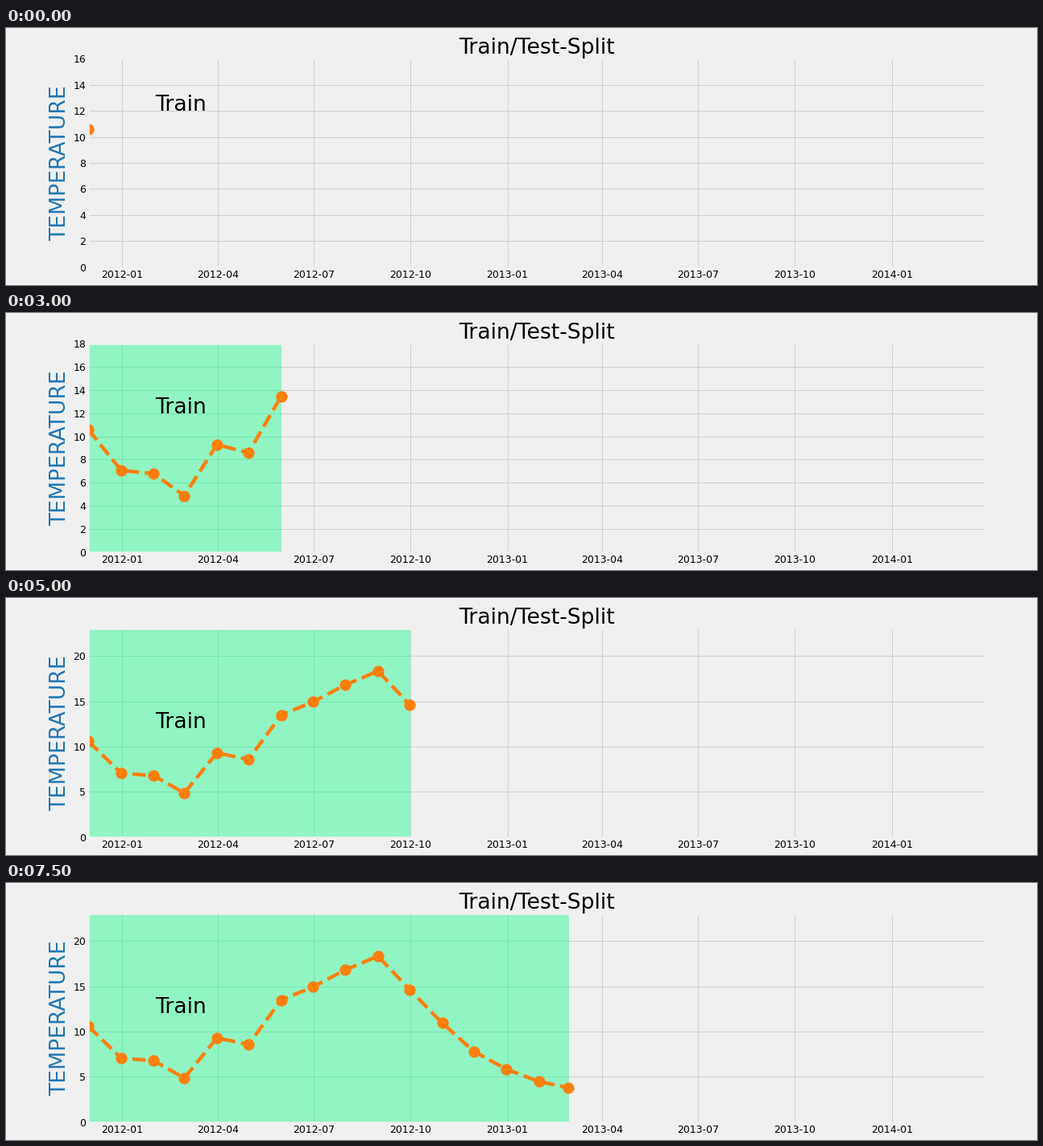
These frames come from a looping animation (1280 by 320 pixels, 8 s). A matplotlib script:

```python
import matplotlib.dates as mdates
import matplotlib.pyplot as plt
import numpy as np
from matplotlib.animation import FuncAnimation

BG = "#f0f0f0"
GRID = "#cbcbcb"
BIG = 30
SPAN_PAD = 0.37  # days, lets the band reach the outer edge of its last pixel

plt.rcParams.update({
    "font.family": "DejaVu Sans",
    "font.size": 14,
    "figure.facecolor": BG,
    "axes.facecolor": BG,
    "axes.edgecolor": BG,
    "axes.linewidth": 3,
    "axes.axisbelow": True,
    "axes.grid": True,
    "grid.color": GRID,
    "grid.linewidth": 1,
    "xtick.major.size": 0,
    "ytick.major.size": 0,
})

# Monthly mean temperatures, dated on the last day of each month
temps = np.array([10.57, 7.06, 6.77, 4.86, 9.29, 8.57, 13.47, 14.92,
                  16.81, 18.33, 14.63, 10.94, 7.80, 5.83, 4.47, 3.78])
months = np.arange("2011-12", "2013-04", dtype="datetime64[M]")
days = mdates.date2num(months.astype("datetime64[D]") - np.timedelta64(1, "D"))


def day(text):
    return mdates.date2num(np.datetime64(text))


fig, ax = plt.subplots(figsize=(20, 5), dpi=64)
fig.subplots_adjust(left=0.08, right=0.95, bottom=0.07, top=0.88)

ax.set_xlim(day("2011-11-30"), day("2014-03-31"))
ax.xaxis.set_major_locator(mdates.MonthLocator((1, 4, 7, 10)))
ax.xaxis.set_major_formatter(mdates.DateFormatter("%Y-%m"))
ax.set_title("Train/Test-Split", fontsize=BIG)
ax.set_ylabel("TEMPERATURE", fontsize=BIG, color="tab:blue")
ax.text(day("2012-02-01"), 12, "Train", fontsize=BIG)

span = ax.axvspan(days[0], days[0] + 1, color="springgreen", alpha=0.4, lw=0)
line, = ax.plot([], [], "o--", color="tab:orange", lw=5, ms=15)


def update(i):
    shown = temps[:i + 1]
    line.set_data(days[:i + 1], shown)
    span.set_visible(i > 0)
    span.set_width(days[i] - days[0] + SPAN_PAD)
    ax.set_ylim(0, round(shown.max()) + 5)
    return line, span


def reset():
    return update(0)


anim = FuncAnimation(fig, update, frames=len(temps), init_func=reset,
                     interval=500, repeat=True, repeat_delay=0, blit=False)
plt.show()
```
